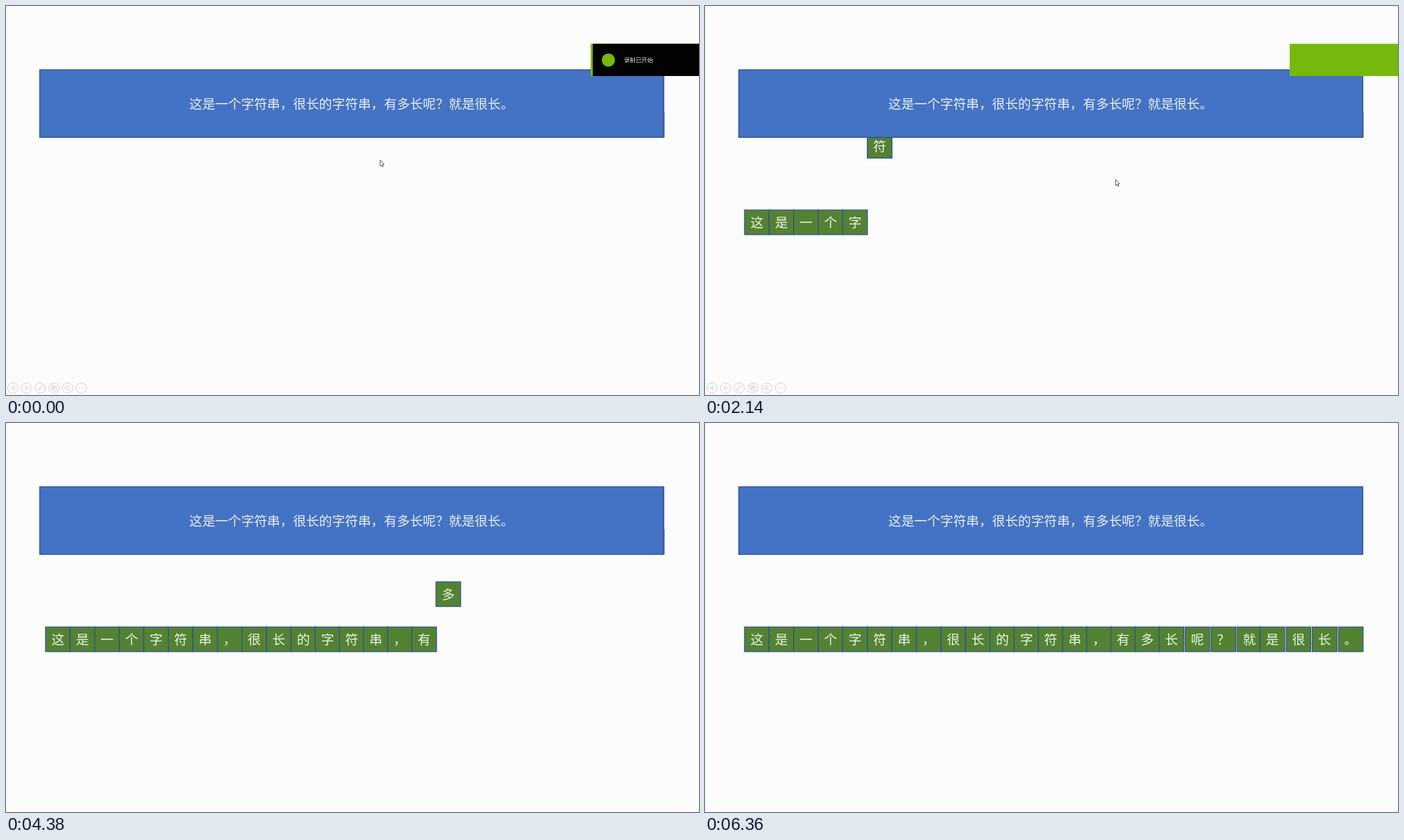
An HTML page with a canvas for the animation above (6.82 s loop, 998 by 561 pixels).

```html
<!DOCTYPE html>
<html lang="zh-CN">
<head>
<meta charset="utf-8">
<title>字符串</title>
<style>
html, body { margin: 0; width: 100%; height: 100%; overflow: hidden; background: #fcfcfc; }
canvas { display: block; }
</style>
</head>
<body>
<canvas id="stage" width="998" height="561"></canvas>
<script>
const ctx = document.getElementById('stage').getContext('2d');
const LOOP = 6820;
const TEXT = '这是一个字符串，很长的字符串，有多长呢？就是很长。';
const SIZE = 18.7;
const TILE = 35.5, TOP = 153.4, BOTTOM = 294.2;
const EDGE = '#2f528f', BLUE = '#4472c4', GREEN = '#548233', LIME = '#76b90c';
const INK = 'rgba(255, 255, 255, 0.9)';

const clamp = v => Math.max(0, Math.min(1, v));
const span = (t, a, b) => clamp((t - a) / (b - a));
const smooth = p => p * p * (3 - 2 * p);

// piecewise linear curve through [input, output] points
const curve = pts => v => pts.slice(1).reduce((sum, [x, y], i) =>
  sum + (y - pts[i][1]) * span(v, pts[i][0], x), pts[0][1]);

const tileX = curve([[0, 57], [10, 410.5], [17, 654], [20, 766.2], [21, 799.4], [24, 912.2]]);
const dropped = curve([[1080, 0], [2140, 5.295], [2780, 8.41], [4380, 16.52], [5460, 22], [6120, 25]]);

function box(x, y, w, h, fill) {
  ctx.fillStyle = fill;
  ctx.fillRect(x, y, w, h);
  ctx.strokeStyle = EDGE;
  ctx.lineWidth = 1.3;
  ctx.strokeRect(x, y, w, h);
}

// y is the middle of the ideographic box
function write(str, x, y, size, color) {
  ctx.font = `300 ${size}px "Noto Sans CJK SC", "Noto Sans CJK", sans-serif`;
  ctx.fillStyle = color;
  ctx.fillText(str, x, y + size * 0.38);
}

function drawTiles(t) {
  const n = dropped(t);
  [...TEXT].forEach((char, i) => {
    const x = tileX(i);
    const y = TOP + (BOTTOM - TOP) * smooth(clamp(n - i));
    box(x, y, TILE, TILE, GREEN);
    write(char, x + (TILE - SIZE) / 2, y + 17.9, SIZE, INK);
  });
}

function drawBanner() {
  box(48.6, 92, 898.7, 97.5, BLUE);
  write(TEXT, 264, 140.9, SIZE, INK);
}

function drawToast(t) {
  const leave = smooth(span(t, 2160, 2340)) * 156;
  if (leave === 156) return;
  ctx.fillStyle = LIME;
  ctx.fillRect(842 + leave, 54.5, 156, 46.5);

  const slide = smooth(span(t, 1960, 2130)) * 153;
  ctx.fillStyle = '#030303';
  ctx.fillRect(845 + slide, 54.5, 153, 46.5);
  ctx.fillStyle = LIME;
  ring(867.5 + slide, 78, 9.5);
  ctx.fill();
  write('录制已开始', 890 + slide, 78.1, 8.4, '#dcdcdc');
}

function line(pts, close) {
  ctx.beginPath();
  pts.forEach(([x, y]) => ctx.lineTo(x, y));
  if (close) ctx.closePath();
}

function ring(x, y, r) {
  ctx.beginPath();
  ctx.arc(x, y, r, 0, Math.PI * 2);
}

const icons = [
  () => line([[2, -3], [-2.5, 0], [2, 3]], true),
  () => line([[-1.5, -3], [3, 0], [-1.5, 3]], true),
  () => line([[-4, 4], [-2.5, 1], [3, -4.5], [4.5, -3], [-1, 2.5]], true),
  () => { ctx.beginPath(); ctx.rect(-4, -4, 5, 5); ctx.rect(-1.5, -1.5, 5.5, 5.5); },
  () => { ring(-1, -1, 3); ctx.moveTo(1.2, 1.2); ctx.lineTo(4.5, 4.5); },
  () => { ctx.beginPath(); for (let x = -3; x <= 3; x += 3) ctx.rect(x - 0.3, -0.3, 0.6, 0.6); }
];

function drawControls() {
  ctx.strokeStyle = '#d0d0d0';
  ctx.lineWidth = 0.9;
  icons.forEach((icon, i) => {
    ctx.save();
    ctx.translate(9.8 + i * 19.75, 551);
    ring(0, 0, 7.5);
    ctx.stroke();
    icon();
    ctx.stroke();
    ctx.restore();
  });
}

function drawCursor(t) {
  const p = smooth(span(t, 0, 200));
  ctx.save();
  ctx.translate(538.8 + 52.6 * p, 222.3 + 28 * p);
  ctx.fillStyle = '#fff';
  ctx.strokeStyle = '#454a50';
  ctx.lineWidth = 0.9;
  line([[0, 0], [0, 8.6], [2, 6.9], [3.3, 9.7], [4.6, 9.1], [3.4, 6.3], [5.7, 6]], true);
  ctx.fill();
  ctx.stroke();
  ctx.restore();
}

function draw(t) {
  ctx.fillStyle = '#fcfcfc';
  ctx.fillRect(0, 0, 998, 561);
  drawTiles(t);
  drawBanner();
  drawToast(t);
  if (t < 3200) {
    drawControls();
    drawCursor(t);
  }
}

const start = performance.now();
function tick() {
  draw((performance.now() - start) % LOOP);
  requestAnimationFrame(tick);
}
tick();
</script>
</body>
</html>
```
